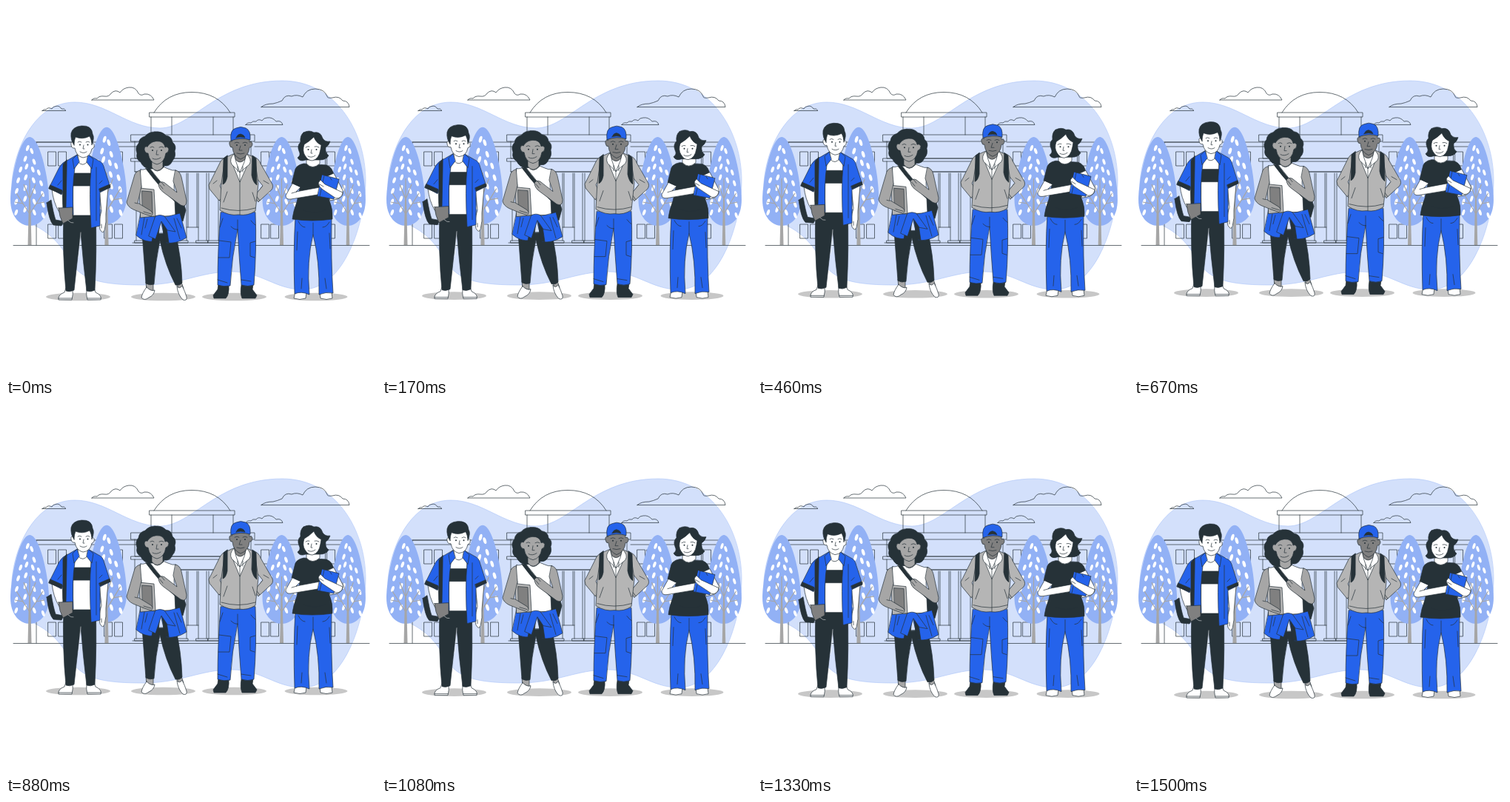
These frames come from a looping animation (500 by 500 pixels, 1540 ms). An HTML page:

```html
<!DOCTYPE html>
<html lang="en">
<head>
<meta charset="utf-8">
<title>Students on campus</title>
<style>
  html, body { margin: 0; height: 100%; overflow: hidden; background: #fff; }
  svg { display: block; width: 100vw; height: 100vh; }
  .line { fill: none; stroke: #263238; stroke-width: .7; stroke-linecap: round; stroke-linejoin: round; }
  .fig path, .fig ellipse { stroke: #263238; stroke-width: .7; stroke-linecap: round; stroke-linejoin: round; fill: none; }
  .fig .w { fill: #fff; }
  .fig .k { fill: #263238; }
  .fig .b { fill: #2563eb; }
  .fig .g { fill: #a6a6a6; }
  .fig .l { fill: #b5b5b5; }
  .fig .d { fill: #808080; }
  .fig .shadow { fill: #c7c7c7; stroke: none; }
  .fig .dot { fill: #263238; stroke: none; }
  .fig .pale { stroke: #fff; stroke-width: .5; }
</style>
</head>
<body>
<svg viewBox="0 0 500 500">
  <path fill="#d3e0fb" stroke="#aac3f8" stroke-width=".6" d="M8 238C12 190 40 130 93 130C136 130 165 165 208 165C252 165 285 101 373 101C446 101 486 170 486 236C486 290 458 384 400 383C364 383 345 359 305 359C262 359 237 377 185 377C138 377 107 373 90 350C74 322 62 310 45 300C22 288 8 270 8 238Z"/>

  <g class="line">
    <path d="M116 127H200Q196 118 187 119Q182 122 179 118Q175 109 166 110Q158 111 154 117Q148 112 142 118Q139 123 133 122Q126 121 123 125Q118 124 116 127Z"/>
    <path d="M49 141.500H81Q79 138 75 139Q72 134 67 135.500Q63 136 62 139Q57 136 54 140Q51 139 49 141.500Z"/>
    <path d="M345 136.500H464Q463 128 455 128Q450 121 441 124Q434 125 434 122Q430 112 418 112Q406 112 401 123Q393 119 386 122Q377 119 373 128Q366 131 361 132Q350 132 345 136.500Z"/>
    <path d="M324 160.500H374Q372 154 365 156Q360 150 353 151Q348 151 346 155Q341 152 338 156Q333 155 331 158Q326 157 324 160.500Z"/>
    <path d="M10 323.500H491M41 323V184H178M38 184H90M336 184H462V323M41 190H178M336 190H462"/>
    <path d="M200 144Q217 116.500 251 116.500Q286 116.500 303 144"/>
    <path d="M194 144H309V150H194ZM196 150V174M307 150V174M224 150V174M280 150V174M169 174H336V183H169ZM174 183V206H331V183M169 206H336V210H169ZM174 210V224H331V210M174 224H331"/>
    <path d="M176 226V317M188 226V317M231 226V317M244 226V317M260 226V317M271 226V317M274 226V317M287 226V317M174 317H190V320H174ZM230 317H246V320H230ZM257 317H273V320H257ZM273 317H289V320H273ZM171 320H335V323M244 299H260M246 226V299M258 226V299"/>
    <path id="windows"/>
  </g>
  <g id="trees"></g>

  <g id="people">
    <g class="fig">
      <ellipse class="shadow" cx="97.500" cy="393" rx="43.500" ry="5.300"/>
      <path class="w" d="M81 381L79 387Q70 390 71 397H89Q91 390 90 382ZM109 382Q108 391 110 397H128Q130 391 121 387L119 381Z"/>
      <path d="M71 395H89M110 395H128"/>
      <path class="k" d="M78 279Q76 335 81 385Q86 387 92 384Q96 345 101 306Q104 345 109 385Q114 387 120 384Q123 330 121 279Z"/>
      <path class="w" d="M62 248Q64 265 71 277L80 288L84 281L77 268L76 247ZM126 248L129 277Q124 293 127 302Q131 309 133 303Q136 292 135 281L138 246Z"/>
      <path class="w" d="M91 207H115V283H91Z"/>
      <path class="k" d="M91 226H115V243H91Z"/>
      <path class="w" d="M97 200V210Q104 219 111 209V200Z"/>
      <path class="b" d="M96 201L84 208Q76 211 72 218L58 246L75 255L77 250V282L91 282Q89 245 93 219ZM111 201L125 209Q131 211 133 220L141 245L127 252L127 297L115 300Q112 250 115 219Z"/>
      <path class="b" d="M96 201L90 207L92 220L99 211ZM111 201L118 207L116 220L109 211Z"/>
      <path class="k" d="M60 242L76 249L75 254L58 247ZM126 247L140 241L141 245L127 251Z"/>
      <path class="k" d="M82 208L77 214V272L81 272L82 222Z"/>
      <path class="k" d="M55 266L61 262Q64 280 67 289L78 291L75 297L64 296Q58 290 55 266Z"/>
      <path class="d" d="M71 273L90 272V287L77 294Q72 285 71 273Z"/>
      <path class="w" d="M91 184Q87 183 88 188Q89 193 93 192Q95 203 104 205Q114 204 116 193Q120 192 119 187L116 184L113 172H94Z"/>
      <path class="k" d="M92 188Q87 181 88 172Q90 163 102 162Q116 161 117 173Q120 178 116 188Q116 180 113 176Q103 181 94 177Q92 181 92 188Z"/>
      <path d="M97 184Q99 182 102 184M108 184Q111 182 113 184M105 188L104 193L106 193M100 197Q105 200 109 197"/>
      <circle class="dot" cx="100" cy="187.500" r="1"/><circle class="dot" cx="110.500" cy="187.500" r="1"/>
      <path d="M122 218V290M70 242L75 236M130 236L126 240M129 295V300"/>
      <path class="pale" d="M101 306L98 340M84 290Q88 294 91 293"/>
    </g>

    <g class="fig">
      <ellipse class="shadow" cx="212.500" cy="393" rx="43.500" ry="5.300"/>
      <path class="g" d="M189 373L190 384L199 385L199 373ZM230 373L234 384L240 382L237 373Z"/>
      <path class="w" d="M190 380Q184 388 183 394Q187 399 193 394Q200 391 201 384Q196 386 190 380ZM231 379Q232 390 239 397Q245 399 244 393Q242 386 238 378Q235 383 231 379Z"/>
      <path class="k" d="M184 308L189 375Q194 378 200 376Q202 345 208 317Q215 350 229 377Q235 378 238 374Q237 340 229 307Z"/>
      <path class="k" d="M228 264L240 266L243 276L239 291L228 283Z"/>
      <path class="w" d="M182 221Q187 222 190 219L196 217H212L219 220Q225 223 230 222L227 243L229 284H182L183 244Q179 231 182 221Z"/>
      <path class="g" d="M197 207V218Q204 228 213 218V207Z"/>
      <path class="k" d="M189 220L194 219Q210 241 232 262L232 268Q209 247 189 220Z"/>
      <path class="g" d="M229 222Q235 223 237 231L244 263Q244 273 236 269L213 252Q206 247 206 240Q211 235 217 241L231 252L226 237Z"/>
      <path d="M210 238L214 243M208 242L212 247"/>
      <path class="b" d="M182 281Q206 290 235 280L244 313Q230 322 216 320L209 290L200 318Q187 320 176 310Z"/>
      <path class="k" d="M202 291L197 319L205 319L208 293ZM211 291L214 319L220 320L216 293Z"/>
      <path class="b" d="M202 284Q208 281 214 284L229 305L218 303L210 291L202 315L193 311Z"/>
      <path d="M187 286L183 309M227 287L235 315M191 288L188 300M231 287L237 300"/>
      <path class="l" d="M180 246L200 248L202 284L182 286Z"/>
      <path class="d" d="M184 250L197 251L198 280L185 280Z"/>
      <path class="g" d="M181 222Q174 224 173 231L163 265Q164 271 172 275L187 281L196 284Q200 281 196 277L178 266L183 244Z"/>
      <path d="M186 278L196 281M174 266L178 267"/>
      <path class="k" d="M201 170Q211 169 216 175Q224 176 225 184Q231 189 228 196Q230 204 225 209Q222 217 214 216L210 220H193Q185 218 182 211Q175 207 177 199Q174 191 179 186Q180 178 188 176Q193 170 201 170Z"/>
      <path class="g" d="M197 210V218Q204 227 212 218V210Z"/>
      <path class="g" d="M191 190Q187 189 187 194Q188 199 192 199Q194 212 204 214Q214 212 216 199Q220 198 220 193Q218 189 215 191Q214 185 208 183Q197 181 191 190Z"/>
      <path d="M195 191Q198 189 200 191M207 191Q210 189 213 191M204 195L203 201H206M198 206Q203 209 209 205"/>
      <circle class="dot" cx="198" cy="195" r="1"/><circle class="dot" cx="210" cy="195" r="1"/>
    </g>

    <g class="fig">
      <ellipse class="shadow" cx="308.500" cy="393" rx="43.500" ry="5.300"/>
      <path class="k" d="M287 376L286 383L280 391L281 395H297Q302 390 301 377ZM318 377Q316 388 319 395H337L339 391L333 383L334 376Z"/>
      <path class="b" d="M290 279Q286 330 286 377Q294 380 303 378Q305 340 313 302Q315 340 318 377Q327 380 335 377Q339 330 337 279Z"/>
      <path d="M313 302V289M288 317L304 319L302 340L287 340M337 318L330 320L330 338L336 340M293 287L289 299M331 290Q335 295 337 296M286 370L299 374M318 370L331 372M304 298Q309 303 313 302"/>
      <path class="g" d="M277 246L291 266L296 259L289 245ZM359 245L341 265L336 258L346 244Z"/>
      <path class="l" d="M299 203Q291 206 288 214L274 242Q274 248 278 251L288 263L295 256L289 243L298 228ZM334 203Q342 206 344 213L360 241Q362 247 356 251L343 263L337 255L347 243L335 228Z"/>
      <path class="l" d="M307 200L296 205L291 240L289 276Q302 284 314 282Q327 284 337 277L341 240L336 205L326 200Z"/>
      <path class="w" d="M308 200L305 211L316 238L328 211L324 200Z"/>
      <path class="d" d="M309 195V206Q316 216 324 206V195Z"/>
      <path class="w" d="M308 200Q301 207 305 214L316 225L311 211ZM325 200Q333 207 329 214L316 225L322 211Z"/>
      <path class="k" d="M299 202L294 206L293 241Q297 240 299 231ZM333 202L338 206L339 242Q334 239 332 229Z"/>
      <path d="M316 225V282M313 217V224M320 217V224M299 251L294 265M333 252L337 264M280 240L285 236M355 240L348 236M291 273Q314 280 337 273"/>
      <path class="d" d="M305 183Q301 182 302 187Q303 192 306 191Q307 203 317 207Q328 203 329 191Q333 191 333 186Q332 182 329 184V177H305Z"/>
      <path class="b" d="M304 182Q302 167 311 165Q317 162 324 165Q331 168 330 181Q317 177 304 182Z"/>
      <path class="k" d="M311 178Q313 173 317 173Q322 174 323 178Q317 176 311 178Z"/>
      <path d="M309 185Q312 183 315 185M320 185Q323 183 326 185M317 189L315 195H319M312 199Q317 201 322 199"/>
      <circle class="dot" cx="312" cy="188" r="1"/><circle class="dot" cx="323" cy="188" r="1"/>
    </g>

    <g class="fig">
      <ellipse class="shadow" cx="419" cy="393" rx="42.500" ry="5.300"/>
      <path class="w" d="M391 386L389 395Q397 398 405 395L406 387ZM424 387L425 395Q433 398 441 395L440 386Z"/>
      <path class="b" d="M391 285Q388 330 390 389Q399 385 410 390Q406 345 415 309Q424 345 423 390Q432 386 442 388Q439 345 440 285Z"/>
      <path d="M415 309V293M395 291Q399 299 404 299M437 292Q433 299 428 299M394 305L393 330M437 307L438 328M400 368L399 382M431 368L433 382"/>
      <path class="k" d="M402 213Q391 215 390 224L386 240L397 246L393 265Q388 278 387 288Q414 292 441 288Q442 275 437 263L434 240L443 230Q442 218 433 215Z"/>
      <path class="w" d="M406 202V213Q414 222 424 213V202Z"/>
      <path class="w" d="M432 231L443 226L455 249Q457 257 448 261L438 263L436 254L444 251Z"/>
      <path class="w" d="M387 240L378 256Q378 262 385 261L421 255L428 252Q430 247 424 245L392 251L398 245Z"/>
      <path class="b" d="M427 228L450 234L443 261L421 257Z"/>
      <path d="M430 229L424 257"/>
      <path class="w" d="M422 239L425 235L431 241L455 252Q454 260 446 260L428 248Q423 245 422 239Z"/>
      <path d="M424 241L429 244M393 251L386 253M402 276Q416 282 432 276M438 232L440 235"/>
      <path class="k" d="M402 171Q410 167 416 171Q425 169 428 179Q431 184 438 183Q436 189 432 191Q431 199 436 202Q433 208 424 208H405Q397 211 394 205Q399 202 396 196Q393 189 398 184Q397 175 402 171Z"/>
      <path class="w" d="M403 187Q400 196 404 202Q408 209 414 209Q423 207 425 194L426 188Q419 185 416 177Q410 183 403 187Z"/>
      <path d="M405 191Q408 189 410 190M417 190Q420 189 423 191M413 194L412 199H414M408 203Q413 206 418 202"/>
      <circle class="dot" cx="408.500" cy="194" r="1"/><circle class="dot" cx="419.500" cy="194" r="1"/>
    </g>
  </g>
</svg>
<script>
  const byId = id => document.getElementById(id);

  byId('windows').setAttribute('d', [57, 71, 133, 147, 345, 358, 421, 434]
    .flatMap(x => [197, 295].map(y => `M${x} ${y}h10.500v19h-10.500z`)).join(''));

  // A tree standing on the ground line at x; leaves follow the crown's outline.
  function tree(x, sx = 1, sy = 1) {
    let leaves = '';
    for (let row = 0; row < 7; row++) {
      const half = 5 + 19 * Math.sin(Math.min(1, row / 5) * Math.PI / 2);
      for (const side of [-1, 1]) {
        for (const k of row < 2 ? [.55] : [.26, .76]) {
          const lx = side * half * k;
          const ly = -133 + row * 14.5 + (k > .5 ? 4 : 0) + side * 2;
          leaves += `<ellipse cx="${lx}" cy="${ly}" rx="2" ry="4.2" transform="rotate(${-side * 18} ${lx} ${ly})"/>`;
        }
      }
    }
    return `<g transform="translate(${x} 323) scale(${sx} ${sy})">
      <path fill="#92b1f5" d="M0-146C14-146 26-88 26-61C26-38 13-26 0-26S-26-38-26-61C-26-88-14-146 0-146Z"/>
      <g fill="#fff">${leaves}</g>
      <path fill="none" stroke="#a6a6a6" stroke-width="1.200" d="M0-50V-90M0-42L-18-70M0-42L18-70M0-62L-8-82M0-62L8-82M-9-56L-20-58M9-56L20-58"/>
      <path fill="#a6a6a6" d="M-2.500 0L-1-62H1L2.500 0Z"/>
    </g>`;
  }
  byId('trees').innerHTML = tree(32) + tree(136, 1.04, 1.09) + tree(372.5) + tree(462, .92);

  const LOOP = 1540, FLOAT = 1500, LIFT = 6;
  const people = byId('people');
  const start = performance.now();
  function draw() {
    const phase = Math.min((performance.now() - start) % LOOP, FLOAT) / FLOAT;
    const rise = LIFT * (1 - Math.abs(1 - 2 * phase));
    people.setAttribute('transform', `translate(0 ${-rise})`);
    requestAnimationFrame(draw);
  }
  draw();
</script>
</body>
</html>
```
